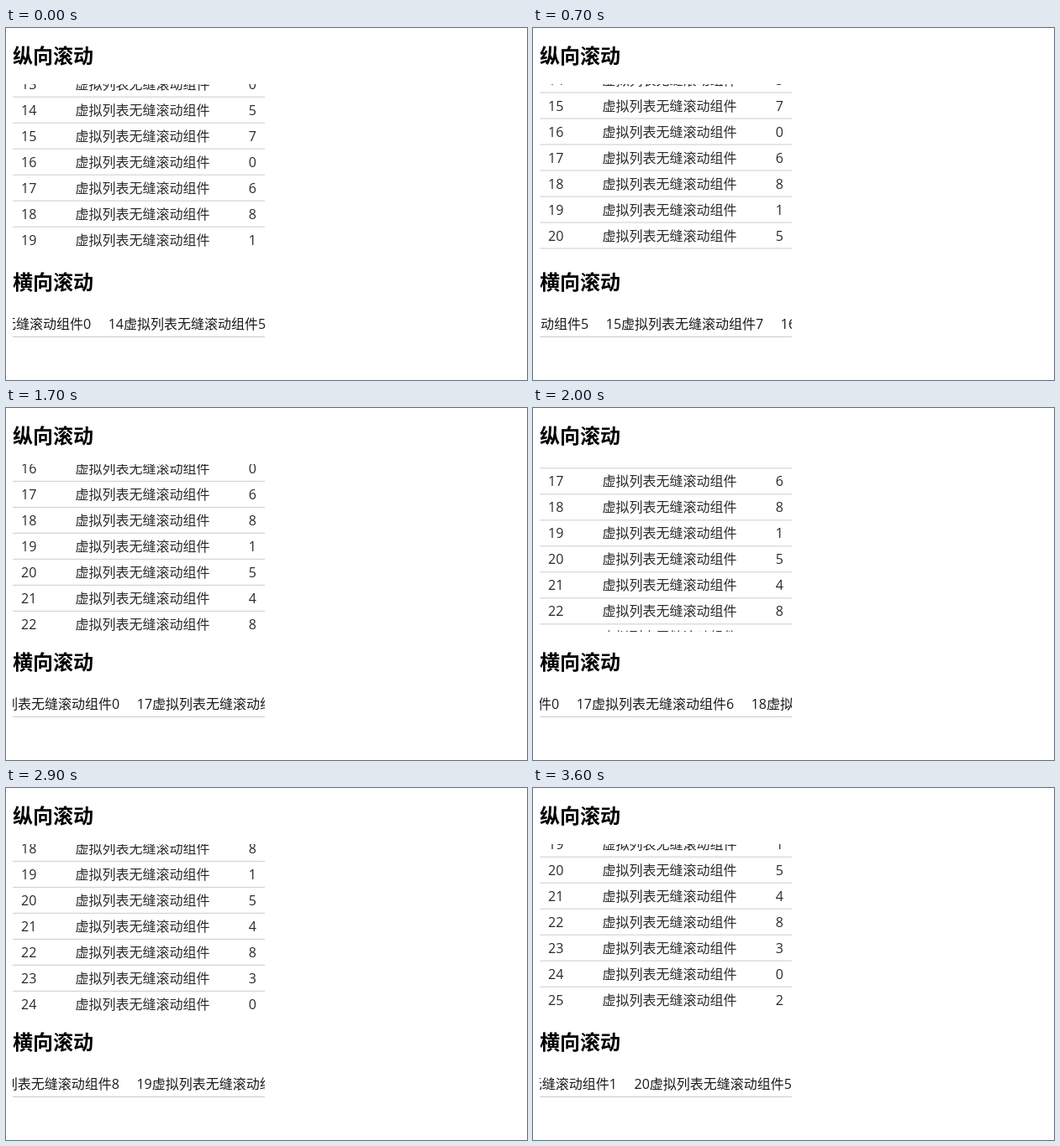
Write an HTML page that moves like this. It is 620 by 420 pixels and loops after 3.7 s.

```html
<!DOCTYPE html>
<html lang="zh-CN">
<head>
<meta charset="utf-8">
<title>无缝滚动</title>
<style>
  html, body { margin: 0; width: 100%; height: 100%; overflow: hidden; background: #fff; }
  svg { display: block; }
  text { font: 16px "Open Sans", "Noto Sans CJK SC", "Noto Sans CJK", sans-serif; }
  .title { font-size: 24px; font-weight: 700; }
  #rows text { fill: #2a2a2a; }
  #items text { fill: #1a1a1a; }
  line { stroke: #ccc; }
</style>
</head>
<body>
<svg width="620" height="420" viewBox="0 0 620 420">
  <clipPath id="listBox"><rect x="8" y="67" width="300" height="200"/></clipPath>
  <clipPath id="tickerBox"><rect x="8" y="339" width="300" height="30"/></clipPath>
  <text class="title" x="8" y="41.6">纵向滚动</text>
  <g clip-path="url(#listBox)"><g id="rows"></g></g>
  <text class="title" x="8" y="312.3">横向滚动</text>
  <g clip-path="url(#tickerBox)"><g id="items"></g></g>
  <line x1="8" x2="308" y1="368.5" y2="368.5"/>
</svg>
<script>
const LOOP = 3700, STEP = 100, ITEM_TIME = 600;
const ROW_HEIGHT = 31, ITEM_PITCH = 208, ITEM_TRAVEL = 208.2;
const FIRST = 13;
const LABEL = '虚拟列表无缝滚动组件';
const scores = [0, 5, 7, 0, 6, 8, 1, 5, 4, 8, 3, 0, 2];

const rows = document.getElementById('rows');
const items = document.getElementById('items');

function add(parent, tag, attrs, content = '') {
  const node = document.createElementNS('http://www.w3.org/2000/svg', tag);
  for (const name in attrs) node.setAttribute(name, attrs[name]);
  node.textContent = content;
  parent.appendChild(node);
}

scores.forEach((score, i) => {
  const border = 81.7 + i * ROW_HEIGHT;
  const y = border - 9;
  add(rows, 'text', { x: 18, y }, FIRST + i);
  add(rows, 'text', { x: 82.5, y }, LABEL);
  add(rows, 'text', { x: 298, y, 'text-anchor': 'end' }, score);
  add(rows, 'line', { x1: 8, x2: 308, y1: border + 0.5, y2: border + 0.5 });
  add(items, 'text', { x: 121.7 + (i - 1) * ITEM_PITCH, y: 359 }, FIRST + i + LABEL + score);
});

function render(time) {
  const progress = Math.floor((time % LOOP) / STEP) * STEP / ITEM_TIME;
  rows.setAttribute('transform', `translate(0 ${-progress * ROW_HEIGHT})`);
  items.setAttribute('transform', `translate(${-progress * ITEM_TRAVEL} 0)`);
}

const start = performance.now();
function tick() {
  render(performance.now() - start);
  requestAnimationFrame(tick);
}
tick();
</script>
</body>
</html>
```
